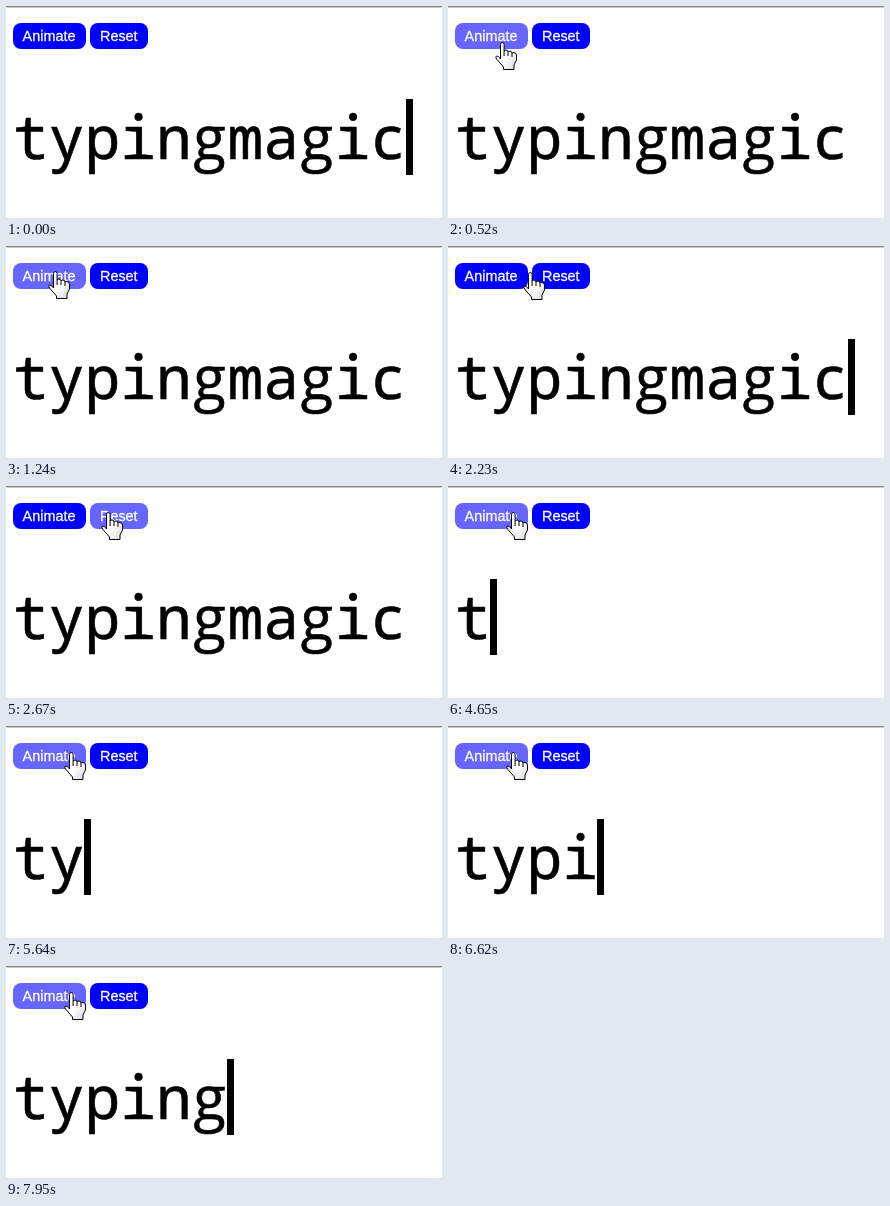
An HTML page for the animation above (8 s loop, 436 px wide and 212 px high).

```html
<!DOCTYPE html>
<html lang="en">
<head>
<meta charset="utf-8">
<title>Typing effect</title>
<style>
html, body { margin: 0; width: 100%; height: 100%; overflow: hidden; background: #fff; }
svg { display: block; }
.label { font: 14.4px "Liberation Sans", Arial, sans-serif; fill: #fff; stroke: #fff; stroke-width: .3; }
.glyph {
  font: 59.57px "Noto Sans Mono", "DejaVu Sans Mono", monospace;
  text-anchor: middle; stroke: #000; stroke-width: .6;
}
.glyph.loop { font-family: "Open Sans", sans-serif; }
</style>
</head>
<body>
<svg width="436" height="212" viewBox="0 0 436 212">
  <defs>
    <linearGradient id="skin" x1="0" y1="0" x2="1" y2="1">
      <stop offset=".55" stop-color="#fff"/>
      <stop offset="1" stop-color="#d4d4d4"/>
    </linearGradient>
  </defs>
  <rect width="436" height="2" fill="#ccc"/>
  <rect width="436" height="1" fill="#888"/>
  <rect id="animate" x="7" y="17" width="73" height="26" rx="8"/>
  <text class="label" x="16.6" y="35">Animate</text>
  <rect id="reset" x="84" y="17" width="58" height="26" rx="8"/>
  <text class="label" x="94" y="35">Reset</text>
  <g id="word"></g>
  <rect id="caret" y="93" width="7" height="76"/>
  <g id="hand" stroke="#000" stroke-linejoin="round">
    <path fill="url(#skin)" d="M5.5 17V2.5Q5.5 .5 7.3 .5T9.1 2.5V9Q9.1 8 11 8T13 10Q13.3 9 15 9T17 11Q17.5 10.3 19 10.5Q21.5 11 21.5 13V18L19 23V27.5H8.5V25L1.5 17Q0 14.8 1.5 14Q3 13.3 5.5 17Z"/>
    <path fill="none" d="M9.1 9V14M13 10V14M17 11V15"/>
  </g>
</svg>
<script>
const LOOP = 8000, LEFT = 7, ADVANCE = 35.74, WORD = 'typingmagic';
const CLEARED = 2700, TYPE_START = 3594, TYPE_STEP = 726;
const MOVES = [
  { start: 190, end: 740, from: [128, 206], to: [42, 25] },
  { start: 2170, end: 2440, from: [42, 25], to: [103, 26] },
  { start: 2640, end: 3160, from: [103, 26], to: [58, 26] }
];

const $ = id => document.getElementById(id);
const show = (el, on) => el.style.display = on ? '' : 'none';

const letters = [...WORD].map((ch, i) => {
  const el = document.createElementNS('http://www.w3.org/2000/svg', 'text');
  el.setAttribute('class', ch === 'g' ? 'glyph loop' : 'glyph');
  el.setAttribute('x', LEFT + ADVANCE * (i + 0.5));
  el.setAttribute('y', 153);
  el.textContent = ch;
  $('word').append(el);
  return el;
});

function typedCount(t) {
  if (t < CLEARED) return WORD.length;
  return Math.max(0, Math.floor((t - TYPE_START) / TYPE_STEP));
}

// The blink restarts when the text is cleared.
function caretOn(t) {
  const beat = t < CLEARED ? (t + 260) / 500 : (t - 2660) / 495;
  return Math.floor(beat) % 2 === 0;
}

function pointerAt(t) {
  const move = MOVES.filter(m => m.start <= t).pop();
  if (!move) return null;
  const k = Math.min(1, (t - move.start) / (move.end - move.start));
  const eased = 1 - (1 - k) ** 3;
  return move.from.map((v, i) => Math.round(v + (move.to[i] - v) * eased));
}

function paintButton(id, tip) {
  const { x, y, width, height } = $(id).getBBox();
  const hover = tip && tip[0] >= x && tip[0] < x + width && tip[1] >= y && tip[1] < y + height;
  $(id).setAttribute('fill', hover ? '#66f' : '#00f');
}

function draw(t) {
  const count = typedCount(t);
  letters.forEach((el, i) => show(el, i < count));
  $('caret').setAttribute('x', Math.floor(LEFT + ADVANCE * count));
  show($('caret'), caretOn(t));

  const pos = pointerAt(t);
  const tip = pos && [pos[0] + 7, pos[1] + 1];
  show($('hand'), pos);
  if (pos) $('hand').setAttribute('transform', `translate(${pos})`);
  paintButton('animate', tip);
  paintButton('reset', tip);
}

function tick() {
  draw(performance.now() % LOOP);
  requestAnimationFrame(tick);
}
tick();
</script>
</body>
</html>
```
